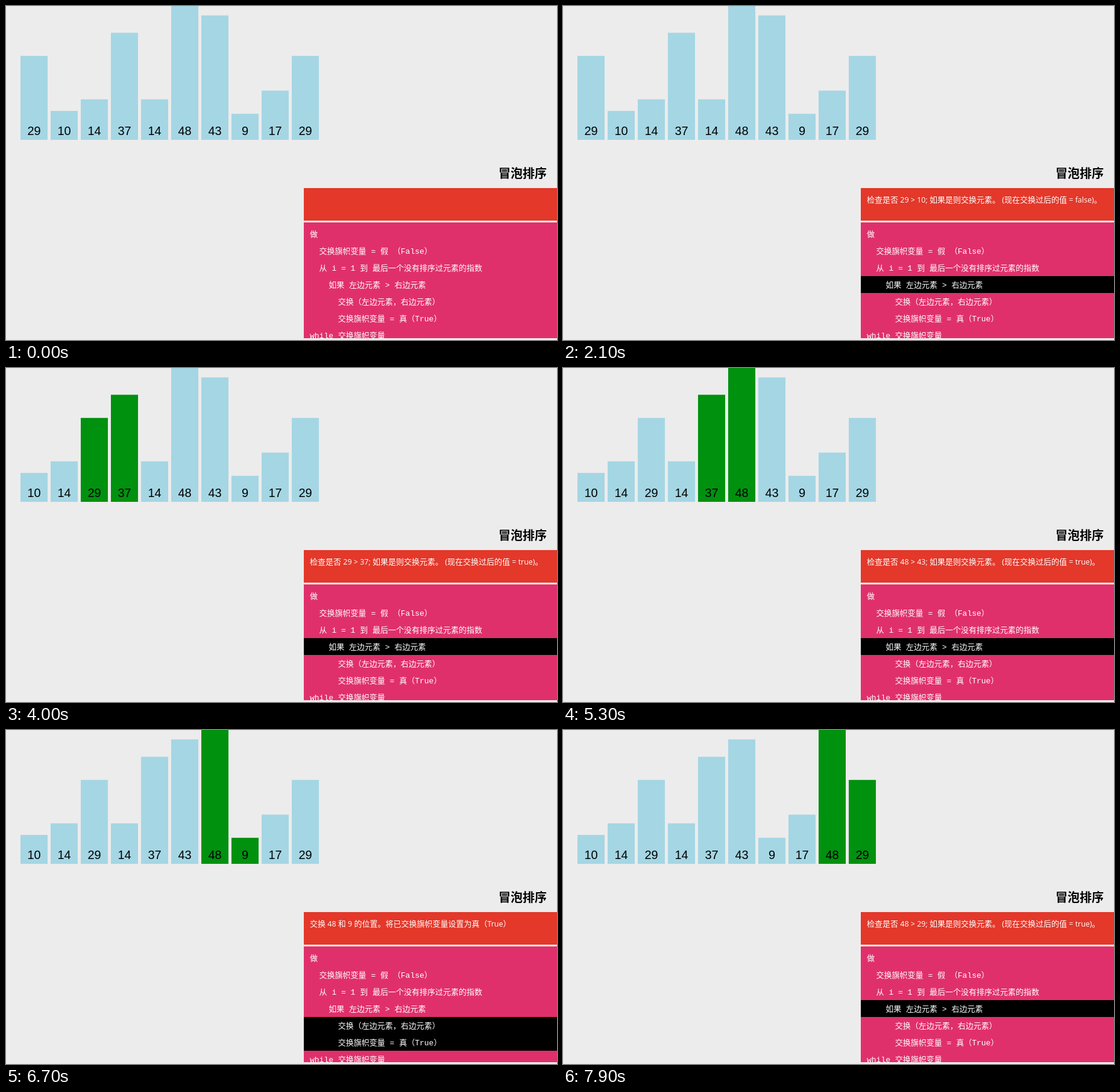
An HTML page with a canvas for the animation above (8000 ms loop, 914 by 554 pixels).

```html
<!DOCTYPE html>
<html lang="zh-CN">
<head>
<meta charset="utf-8">
<title>冒泡排序</title>
<style>
html, body { margin: 0; width: 100%; height: 100%; overflow: hidden; background: #ececec; }
canvas { display: block; }
</style>
</head>
<body>
<canvas id="stage" width="914" height="554"></canvas>
<script>
const ctx = document.getElementById('stage').getContext('2d');
const LOOP = 8000, TICK = 100;
const CJK = '"Noto Sans CJK SC", "Noto Sans CJK"';
const BLUE = [165, 214, 228], GREEN = [0, 145, 15];
const values = [29, 10, 14, 37, 14, 48, 43, 9, 17, 29];
const code = [
  '做',
  '  交换旗帜变量 = 假 （False）',
  '  从 i = 1 到 最后一个没有排序过元素的指数',
  '    如果 左边元素 > 右边元素',
  '      交换（左边元素，右边元素）',
  '      交换旗帜变量 = 真（True）',
  'while 交换旗帜变量'
];

// Tick at which each step appears, and how many ticks its transition is already under way.
const starts = [21, 27, 31, 36, 39, 44, 46, 51, 53, 59, 62, 67, 70, 74, 77];
const leads = [0, 0, 2, 0, 2, 2, 0, 2, 0, 0, 2, 0, 1, 0, 1];

function buildSteps() {
  const order = values.map((_, i) => i);
  const idle = { start: 0, text: '', rows: [], pair: [], before: [...order], after: [...order] };
  const steps = [idle, {
    ...idle, start: 19, rows: [1, 2],
    text: '将已交换旗帜变量设置为假（False），然后从 1 到 9 进行循环。'
  }];
  let swapped = false;
  const add = (text, rows, pair, before) => {
    const n = steps.length - 2;
    steps.push({ start: starts[n], lead: leads[n], text, rows, pair, before, after: [...order] });
  };
  for (let i = 0; i < 9; i++) {
    const pair = [order[i], order[i + 1]];
    const [a, b] = pair.map(id => values[id]);
    const before = [...order];
    add(`检查是否 ${a} > ${b}; 如果是则交换元素。 (现在交换过后的值 = ${swapped})。`, [3], pair, before);
    if (a > b) {
      [order[i], order[i + 1]] = [order[i + 1], order[i]];
      swapped = true;
      add(`交换 ${a} 和 ${b} 的位置。将已交换旗帜变量设置为真（True）`, [4, 5], pair, before);
    }
  }
  return steps.filter(s => s.start !== undefined);
}

const steps = buildSteps();
const mix = (a, b, p) => a + (b - a) * p;
const ease = t => t < 0.5 ? 4 * t ** 3 : 1 - 4 * (1 - t) ** 3;

function rect(x, y, w, h, color) {
  ctx.fillStyle = color;
  ctx.fillRect(x, y, w, h);
}

function label(text, x, y, font, color, align = 'left') {
  ctx.font = font;
  ctx.fillStyle = color;
  ctx.textAlign = align;
  ctx.fillText(text, x, y);
}

function drawStatus(text) {
  let x = 504;
  for (const run of text.match(/[ -~]+|[^ -~]+/g) || []) {
    const font = /[ -~]/.test(run) ? '12.5px "Open Sans", sans-serif' : `13px ${CJK}, sans-serif`;
    label(run, x, 326, font, '#fff');
    x += ctx.measureText(run).width;
  }
}

function drawBars(step, previous, p) {
  const xs = values.map((_, id) => 24 + 50 * mix(step.before.indexOf(id), step.after.indexOf(id), p));
  values.forEach((value, id) => {
    const glow = mix(+previous.pair.includes(id), +step.pair.includes(id), p);
    const color = BLUE.map((c, i) => Math.round(mix(c, GREEN[i], glow)));
    rect(xs[id], 222 - value * 4.8, 45, value * 4.8, `rgb(${color})`);
  });
  values.forEach((value, id) =>
    label(value, xs[id] + 22.5, 214, '20px "Liberation Sans", Arial, sans-serif', '#000', 'center'));
}

function drawCode(rows) {
  rect(494, 359, 420, 192, '#e0306b');
  for (const row of rows) rect(494, 364 + 28 * row, 420, 28, '#000');
  ctx.save();
  ctx.beginPath();
  ctx.rect(494, 359, 420, 192);
  ctx.clip();
  code.forEach((line, i) =>
    label(line, 504, 383 + 28 * i, `13px "Liberation Mono", ${CJK}, monospace`, '#fff'));
  ctx.restore();
}

function draw() {
  const tick = Math.floor(performance.now() % LOOP / TICK);
  const n = steps.filter(s => s.start <= tick).length - 1;
  const step = steps[n], previous = steps[Math.max(0, n - 1)];
  const swapping = step.rows.includes(4);
  const elapsed = Math.min(tick - step.start, swapping ? 2 : 9) + (step.lead || 0);

  rect(0, 0, 914, 554, '#ececec');
  drawBars(step, previous, ease(Math.min(1, elapsed * 0.37)));
  label('冒泡排序', 817, 285, `bold 20px ${CJK}, sans-serif`, '#000');
  rect(494, 302, 420, 54, '#e3382a');
  drawStatus(step.text);
  drawCode(step.rows);
  requestAnimationFrame(draw);
}
draw();
</script>
</body>
</html>
```
